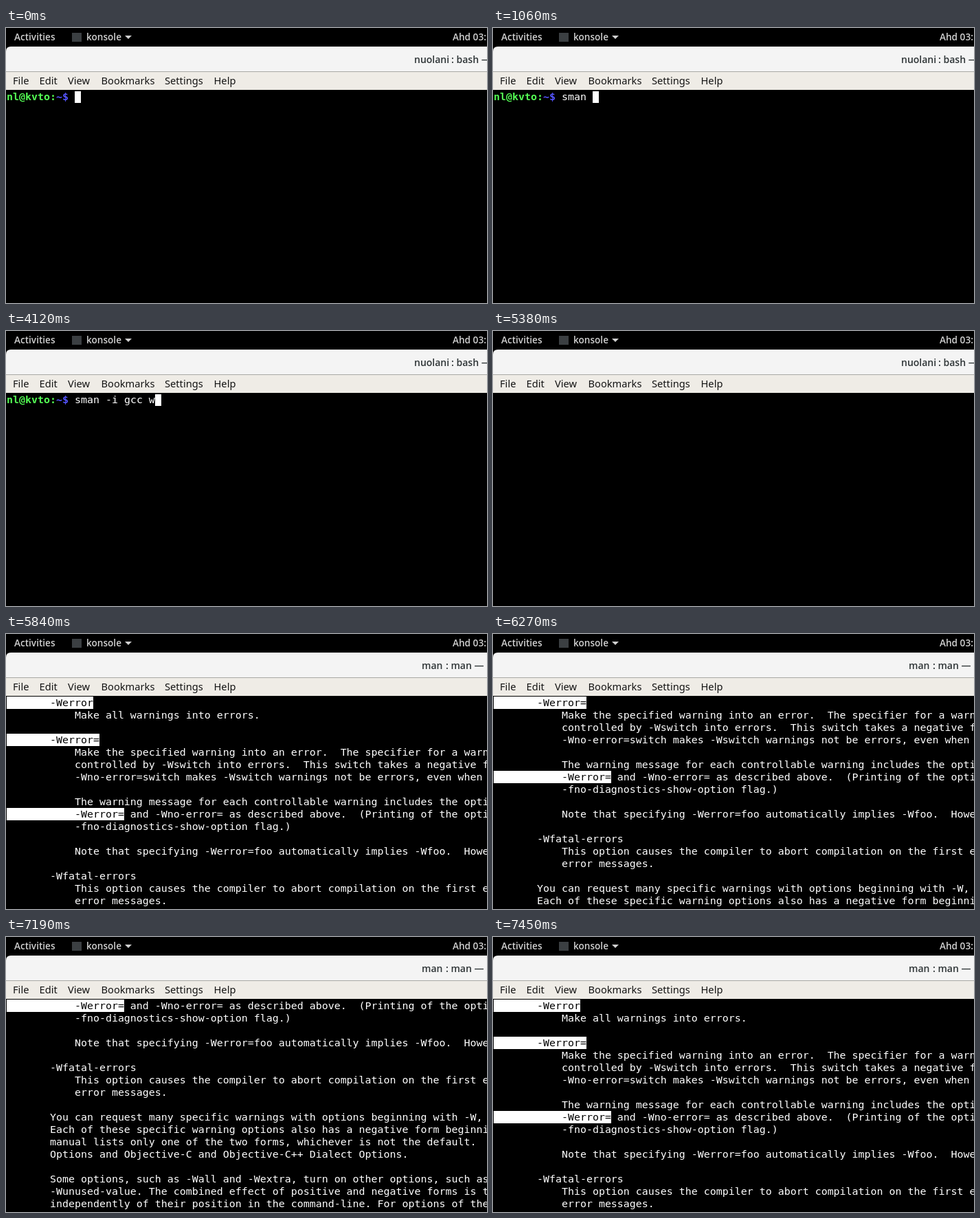
Animation, 700 px wide and 400 px high, one loop 8 s. Source, as an HTML page:

```html
<!DOCTYPE html>
<html lang="en">
<head>
<meta charset="utf-8">
<title>Terminal</title>
<style>
  html, body { margin: 0; width: 100%; height: 100%; overflow: hidden; background: #000; }
  #stage { position: relative; width: 700px; height: 400px; overflow: hidden; background: #000; }
  svg { position: absolute; left: 0; top: 0; }
  .bar, .title { font-family: "Open Sans", "Noto Sans", sans-serif; font-weight: 600; }
  .bar { font-size: 13.6px; fill: #d0d0d0; }
  .title { font-size: 14px; fill: #2e3436; }
  .menu { font: 14.67px "Noto Sans", sans-serif; fill: #141414; }
  #screen {
    position: absolute; left: 1px; top: 91px; margin: 0; color: #fff;
    font: 14.95px/18px "DejaVu Sans Mono", monospace; white-space: pre;
  }
  #screen b { color: #54ff54; }
  #screen b + b { color: #5454ff; }
  #screen mark { background: #fff; color: #000; }
  #cursor { position: absolute; top: 92px; width: 9px; height: 17px; background: #fff; }
</style>
</head>
<body>
<div id="stage">
  <svg width="700" height="400">
    <g class="bar">
      <text x="12" y="18">Activities</text>
      <text x="117" y="18">konsole</text>
      <text x="650" y="18">Ahd 03:</text>
    </g>
    <rect x="96" y="7" width="14" height="13" fill="#3b3f42"/>
    <path d="M173 11h10l-5 5z" fill="#d0d0d0"/>
    <path d="M0 64V34q0-7 7-7H700V64z" fill="#f4f4f4"/>
    <rect y="63" width="700" height="1" fill="#a9a9a5"/>
    <rect y="64" width="700" height="26" fill="#efece6"/>
    <g class="title">
      <text id="name" y="51"></text>
      <text id="job" y="51"></text>
    </g>
    <g class="menu">
      <text x="10" y="82">File</text>
      <text x="48.5" y="82">Edit</text>
      <text x="90" y="82">View</text>
      <text x="138.5" y="82">Bookmarks</text>
      <text x="231" y="82">Settings</text>
      <text x="302.5" y="82">Help</text>
    </g>
  </svg>
  <pre id="screen"></pre>
  <div id="cursor"></div>
</div>
<script>
const LOOP = 8000, ROWS = 18, CELL = 9;
const COMMAND = "sman -i gcc werror";
const KEY_TIMES = [450, 660, 700, 860, 1060, 1890, 2190, 2320, 2630,
                   2850, 2980, 3240, 4120, 4380, 4710, 4900, 5050, 5200];
const PROMPT = "<b>nl@kvto:</b><b>~$</b> ";
const PROMPT_END = 100;

// "#" marks an option heading; other lines are body text, "<" pulls a line out to the heading indent.
const WARNINGS = `#-Werror
Make all warnings into errors.

#-Werror=
Make the specified warning into an error.  The specifier for a warning is
controlled by -Wswitch into errors.  This switch takes a negative form, to
-Wno-error=switch makes -Wswitch warnings not be errors, even when -Werror

The warning message for each controllable warning includes the option that
-Werror= and -Wno-error= as described above.  (Printing of the option in the
-fno-diagnostics-show-option flag.)

Note that specifying -Werror=foo automatically implies -Wfoo.  However,

#-Wfatal-errors
This option causes the compiler to abort compilation on the first error
error messages.

<You can request many specific warnings with options beginning with -W, for example
<Each of these specific warning options also has a negative form beginning -Wno-
<manual lists only one of the two forms, whichever is not the default.  For further
<Options and Objective-C and Objective-C++ Dialect Options.

<Some options, such as -Wall and -Wextra, turn on other options, such as -Wunused,
<-Wunused-value. The combined effect of positive and negative forms is that more
<independently of their position in the command-line. For options of the same
<disabled via pragmas take effect as if they appeared at the end of the command-line.`;

const PREPROCESSOR = `#-Werror
Make all warnings into hard errors.  Source code which triggers warnings will

#-Wsystem-headers
Issue warnings for code in system headers.  These are normally unhelpful in
you are responsible for the system library, you may want to see them.

<-w  Suppress all warnings, including those which GNU CPP issues by default.

#-pedantic
Issue all the mandatory diagnostics listed in the C standard.  Some of them are
harmless code.

#-pedantic-errors
Issue all the mandatory diagnostics, and make all mandatory diagnostics into
issues without -pedantic but treats as warnings.

<-M  Instead of outputting the result of preprocessing, output a rule suitable`;

const formatLine = line => {
  const outdented = /^[#<]/.test(line);
  const text = line && " ".repeat(outdented ? 7 : 11) + line.slice(outdented ? 1 : 0);
  return text.replace(/^ +-Werror=?/, "<mark>$&</mark>");
};
const page = (doc, top) =>
  doc.split("\n").slice(top, top + ROWS).map(formatLine).join("\n");

const first = page(WARNINGS, 0), second = page(WARNINGS, 3),
      third = page(WARNINGS, 9), fourth = page(PREPROCESSOR, 0);
const PAGES = [
  [5380, ""], [5490, first], [6270, second], [6420, third],
  [6570, fourth], [7190, third], [7300, second], [7450, first]
];
const TITLES = [
  [0, { name: ["nuolani", 594], job: [": bash — Konsole", 648] }],
  [5840, { name: ["man", 605], job: [": man — Konsole", 640] }]
];

const byId = id => document.getElementById(id);
const screenBox = byId("screen"), cursor = byId("cursor");
const latest = (steps, t) => steps.filter(([at]) => at <= t).pop();
let shownScreen, shownTitle;

function setScreen(html) {
  if (html !== shownScreen) screenBox.innerHTML = shownScreen = html;
}

function setTitle(title) {
  if (title === shownTitle) return;
  shownTitle = title;
  for (const id in title) {
    byId(id).textContent = title[id][0];
    byId(id).setAttribute("x", title[id][1]);
  }
}

function render(t) {
  const current = latest(PAGES, t);
  const typed = KEY_TIMES.filter(at => at <= t).length;
  setScreen(current ? current[1] : PROMPT + COMMAND.slice(0, typed));
  cursor.style.display = current ? "none" : "block";
  cursor.style.left = PROMPT_END + typed * CELL + "px";
  setTitle(latest(TITLES, t)[1]);
}

const start = performance.now();
function tick() {
  render((performance.now() - start) % LOOP);
  requestAnimationFrame(tick);
}
tick();
</script>
</body>
</html>
```
